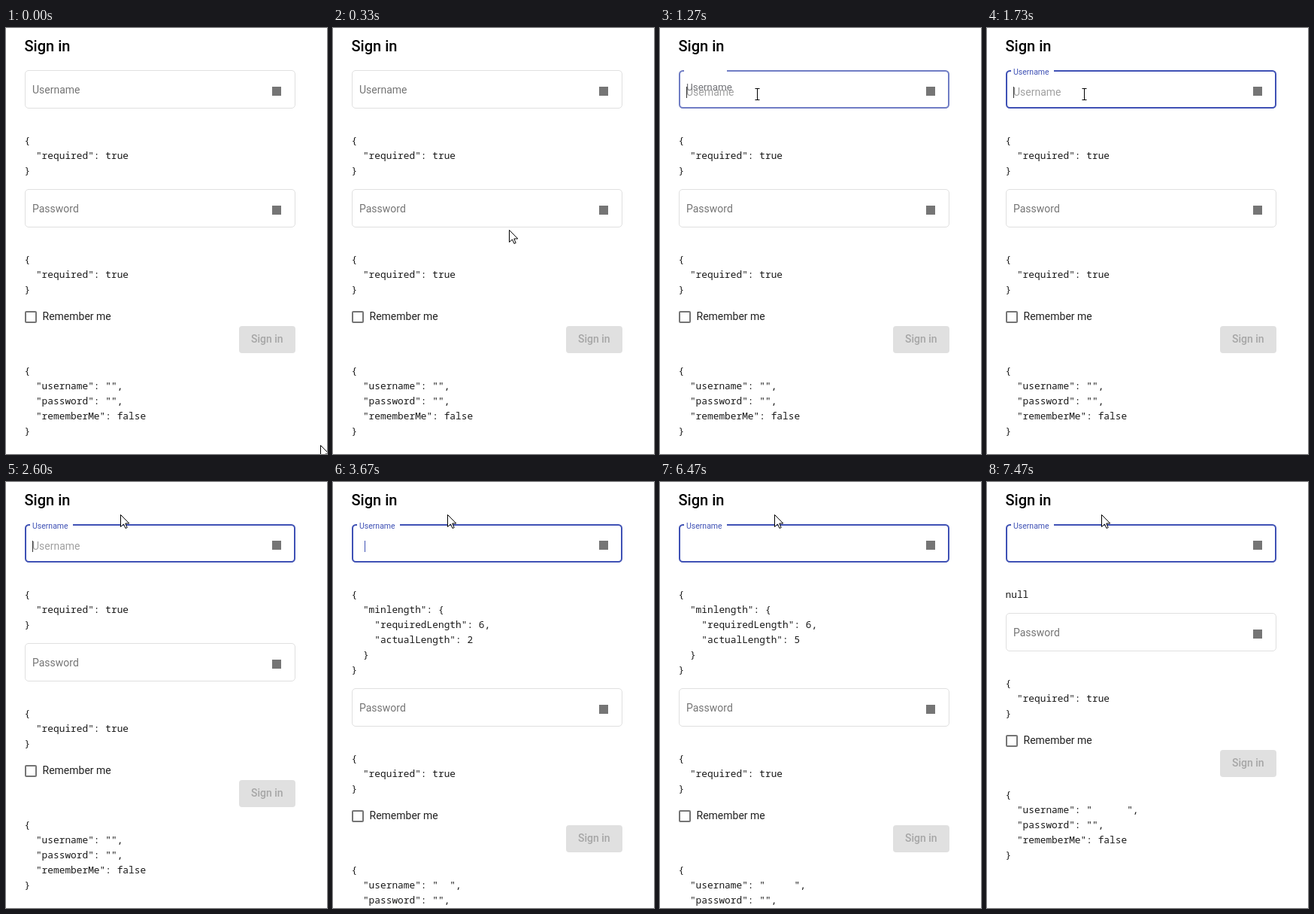
An HTML page with a canvas for the animation above (8000 ms loop, 427 px wide and 566 px high).

```html
<!DOCTYPE html>
<html lang="en">
<head>
<meta charset="utf-8">
<title>Sign in form</title>
<style>
  html, body { margin: 0; width: 100%; height: 100%; overflow: hidden; background: #fff; }
  canvas { display: block; }
</style>
</head>
<body>
<canvas id="stage" width="427" height="566"></canvas>
<script>
const ctx = document.getElementById("stage").getContext("2d");
const LOOP = 8000, TICK = 1000 / 15;
const INDIGO = "#3f51b5", INK = "#212121", HINT = "#757575";
const SANS = "Roboto, sans-serif";
const MONO = "12.83px 'Noto Sans Mono', monospace";
const FOCUS_AT = 1250, BLINK = 530;
const KEY_TIMES = [2870, 3670, 4400, 5130, 5930, 6930];
const POINTER_PATH = [
  [0, 418, 554], [530, 148, 133], [870, 148, 133], [930, 146, 125],
  [1200, 129, 88], [2070, 129, 88], [2600, 152, 43]
];

const clamp = v => Math.max(0, Math.min(1, v));
const lerp = (a, b, p) => a + (b - a) * p;

// cubic-bezier(.25, .8, .25, 1)
function swift(x) {
  let lo = 0, hi = 1, s = 0;
  for (let i = 0; i < 24; i++) {
    s = (lo + hi) / 2;
    const bx = 0.75 * s * (1 - s) + s ** 3;
    if (bx < x) lo = s; else hi = s;
  }
  return 2.4 * s * (1 - s) ** 2 + 3 * s * s * (1 - s) + s ** 3;
}

function pointerAt(t) {
  const i = POINTER_PATH.findIndex(k => k[0] > t);
  if (i < 0) return POINTER_PATH[POINTER_PATH.length - 1].slice(1);
  const [t0, x0, y0] = POINTER_PATH[i - 1], [t1, x1, y1] = POINTER_PATH[i];
  const u = (t - t0) / (t1 - t0), p = u * u * (3 - 2 * u);
  return [Math.round(lerp(x0, x1, p)), Math.round(lerp(y0, y1, p))];
}

function text(str, x, y, font, color) {
  ctx.font = font;
  ctx.fillStyle = color;
  ctx.fillText(str, x, y);
}

function json(value, top) {
  const lines = JSON.stringify(value, null, 2).split("\n");
  lines.forEach((line, i) => text(line, 24.5, top + i * 20, MONO, "#1a1a1a"));
  return lines.length;
}

function outline(y, width, color, alpha = 1) {
  ctx.globalAlpha = alpha;
  ctx.strokeStyle = color;
  ctx.lineWidth = width;
  ctx.beginPath();
  ctx.roundRect(25 + width / 2, y + width / 2, 360 - width, 51 - width, 4.5);
  ctx.stroke();
  ctx.globalAlpha = 1;
}

function fieldIcon(y) {
  ctx.fillStyle = HINT;
  ctx.fillRect(354, y + 22, 12, 12);
}

function usernameField(t, count, hovered) {
  const y = 56, focused = t >= FOCUS_AT;
  outline(y, 1, "#e0e0e0");
  if (!focused) {
    if (hovered) outline(y, 2, INK, clamp((t - 1000) / 600));
    text("Username", 35, y + 31, "14px " + SANS, HINT);
  } else {
    outline(y, 2, INDIGO, lerp(0.7, 1, clamp((t - FOCUS_AT) / 300)));
    ctx.fillStyle = "#fff";
    ctx.fillRect(32, y - 1, 57, 4);
    if (!count) text("Username", 35, 90, "14px " + SANS, "#a0a0a0");
    const p = swift(clamp((t - FOCUS_AT) / 400));
    const c = clamp((t - FOCUS_AT) / 400);
    const color = `rgb(${lerp(117, 63, c)},${lerp(117, 81, c)},${lerp(117, 181, c)})`;
    text("Username", 35, lerp(87, 62, p), `${lerp(14, 10.5, p)}px ${SANS}`, color);
    const since = t - (count ? KEY_TIMES[count - 1] : 1270);
    if (Math.floor((since + 5) / BLINK) % 2 === 0) {
      ctx.fillStyle = count ? INDIGO : "#333";
      ctx.fillRect(Math.round(35 + count * 3.47), 78, 1, 15);
    }
  }
  fieldIcon(y);
}

function passwordField(y, hovered) {
  outline(y, 1, "#e0e0e0");
  if (hovered) outline(y, 2, INK, 0.45);
  text("Password", 35, y + 31, "14px " + SANS, HINT);
  fieldIcon(y);
}

function actions(y) {
  ctx.strokeStyle = HINT;
  ctx.lineWidth = 2;
  ctx.beginPath();
  ctx.roundRect(26, y + 1, 14, 14, 1);
  ctx.stroke();
  text("Remember me", 48.5, y + 12, "14px " + SANS, INK);
  ctx.fillStyle = "#e0e0e0";
  ctx.beginPath();
  ctx.roundRect(310, y + 20, 75, 36, 4);
  ctx.fill();
  text("Sign in", 326, y + 42, "500 14px " + SANS, "#a6a6a6");
}

function polygon(points) {
  ctx.beginPath();
  points.forEach(([x, y]) => ctx.lineTo(x, y));
  ctx.closePath();
}

function pointer(x, y) {
  ctx.save();
  ctx.translate(x + 0.5, y + 0.5);
  ctx.lineWidth = 1;
  ctx.strokeStyle = "#000";
  if (y > 66 && y < 98) {
    ctx.beginPath();
    for (const end of [-8, 7]) {
      ctx.moveTo(-3, end);
      ctx.lineTo(3, end);
    }
    ctx.moveTo(0, -8);
    ctx.lineTo(0, 7);
  } else {
    polygon([[0, 0], [0, 16], [4, 12.5], [6.5, 18], [8.7, 17], [6.3, 11.5], [11.3, 11.5]]);
    ctx.fillStyle = "#fff";
    ctx.fill();
  }
  ctx.stroke();
  ctx.restore();
}

function draw(t) {
  const count = KEY_TIMES.filter(k => k <= t).length;
  const [px, py] = pointerAt(t);
  const over = top => px >= 25 && px < 385 && py >= top && py < top + 51;
  let errors = null;
  if (!count) errors = { required: true };
  else if (count < 6) errors = { minlength: { requiredLength: 6, actualLength: count } };

  ctx.fillStyle = "#fff";
  ctx.fillRect(0, 0, 427, 566);
  text("Sign in", 24.5, 31, "500 20px " + SANS, "#000");
  usernameField(t, count, over(56));
  const top = 154 + json(errors, 154) * 20;
  passwordField(top, over(top));
  json({ required: true }, top + 98);
  actions(top + 162);
  json({ username: " ".repeat(count), password: "", rememberMe: false }, top + 246);
  pointer(px, py);
}

// The screen refreshes fifteen times a second.
function frame(now) {
  const tick = Math.floor((now % LOOP + 4) / TICK) % 120;
  draw(Math.round(tick * TICK / 10) * 10);
  requestAnimationFrame(frame);
}
requestAnimationFrame(frame);
</script>
</body>
</html>
```
